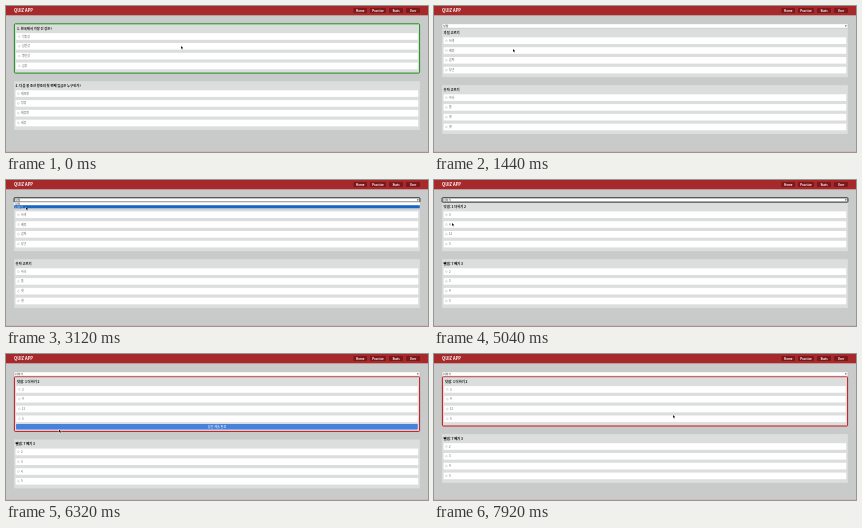
An HTML page with a canvas for the animation above (8 s loop, 422 by 146 pixels).

```html
<!DOCTYPE html>
<html lang="ko">
<head>
<meta charset="utf-8">
<title>Quiz</title>
<style>
  html, body { margin: 0; width: 100%; height: 100%; overflow: hidden; background: #c9cbca; }
  canvas { display: block; }
</style>
</head>
<body>
<canvas id="stage" width="422" height="146"></canvas>
<script>
const ctx = document.getElementById('stage').getContext('2d');
const LOOP = 8000;
const LEFT = 8.2, WIDTH = 405.6;
const FONT = '"Noto Sans CJK KR", "Noto Sans CJK", "Noto Sans", sans-serif';

// Page changes, in ms
const OPEN_QUIZ = 960, FOCUS = 2560, OPEN_LIST = 2640, NEXT_OPTION = 2800,
      CHOOSE = 3360, ANSWER = 5360, SUBMIT = 6240, HIDE_BUTTON = 6640;

const quizzes = {
  history: [
    { title: '1. 한국에서 가장 긴 강은?', options: ['낙동강', '섬진강', '영산강', '금강'] },
    { title: '2. 다음 중 조선 왕조의 첫 번째 임금은 누구인가?', options: ['태조왕', '정종', '태종왕', '세종'] }
  ],
  words: [
    { title: '과일 고르기', options: ['사과', '배추', '감자', '당근'] },
    { title: '숫자 고르기', options: ['하나', '둘', '셋', '넷'] }
  ],
  sums: [
    { title: '덧셈: 1 더하기 2', options: ['3', '4', '12', '5'] },
    { title: '뺄셈: 7 빼기 3', options: ['2', '3', '4', '5'] }
  ]
};

// Pointer positions: time, x, y
const pointerPath = [
  [0, 175, 40], [400, 17, 103], [800, 18, 6], [960, 18, 7], [1440, 79, 43],
  [1760, 79, 43], [2560, 22, 20], [2720, 22, 23], [2880, 20, 27], [3760, 20, 27],
  [4400, 18, 43], [5040, 18, 43], [5360, 12.5, 34], [5840, 32.5, 55],
  [6240, 53, 75], [6400, 53, 76], [6720, 50, 78], [6960, 18, 45], [7200, 394, 24],
  [7520, 247, 68], [7720, 247, 68], [7920, 239, 61], [8000, 239, 61]
];

function pointerAt(t) {
  const i = pointerPath.findIndex(p => p[0] > t);
  const [t0, x0, y0] = pointerPath[i - 1], [t1, x1, y1] = pointerPath[i];
  const p = (t - t0) / (t1 - t0), e = p * p * (3 - 2 * p);
  return [x0 + (x1 - x0) * e, y0 + (y1 - y0) * e];
}

function rect(x, y, w, h, color) {
  ctx.fillStyle = color;
  ctx.fillRect(x, y, w, h);
}

function outline(x, y, w, h, color, width, radius = 0) {
  ctx.strokeStyle = color;
  ctx.lineWidth = width;
  ctx.beginPath();
  ctx.roundRect(x, y, w, h, radius);
  ctx.stroke();
}

function text(value, x, y, size, color, weight = 400, align = 'left') {
  ctx.font = `${weight} ${size}px ${FONT}`;
  ctx.fillStyle = color;
  ctx.textAlign = align;
  ctx.textBaseline = 'middle';
  ctx.fillText(value, x, y);
}

function drawHeader() {
  rect(0, 0, 422, 9.3, '#a62a2b');
  text('QUIZ APP', 8, 4.5, 4.1, '#fff', 700);
  [['Home', 347.5, 13.5], ['Practice', 364, 16], ['Stats', 383, 14], ['User', 400, 14]]
    .forEach(([label, x, w]) => {
      ctx.fillStyle = '#7d1719';
      ctx.beginPath();
      ctx.roundRect(x, 1.9, w, 5.2, 0.8);
      ctx.fill();
      text(label, x + w / 2, 4.5, 2.9, '#fff', 700, 'center');
    });
  rect(0, 145.1, 422, 0.9, '#d9b5b6');
}

function drawRadio(x, y, selected) {
  ctx.beginPath();
  ctx.arc(x, y, 0.9, 0, Math.PI * 2);
  ctx.fillStyle = selected ? '#3478d8' : '#fff';
  ctx.fill();
  ctx.strokeStyle = selected ? '#3478d8' : '#999';
  ctx.lineWidth = 0.3;
  ctx.stroke();
}

// Draws one question and returns the y of the next one
function drawCard(y, { title, options }, { border, button, selected } = {}) {
  const inset = border ? 0.9 : 0;
  const height = 48.8 + inset + (button ? 5.4 : 0);
  rect(LEFT, y, WIDTH, height, '#dcdedd');
  if (border) outline(LEFT + 0.2, y + 0.4, WIDTH - 0.4, height - 0.4, border, 1, 0.8);
  text(title, 9.6 + inset * 1.6, y + 4.7 + inset / 2, 3.3, '#111', 700);
  options.forEach((option, i) => {
    const top = y + 9.1 + inset * 0.8 + i * 9.8;
    rect(9.6 + inset / 2, top, 402.6 - inset, 6.6, '#fff');
    drawRadio(12.4 + inset, top + 3.3, i === selected);
    text(option, 15 + inset, top + 3.3, 2.9, '#555');
  });
  if (button) {
    const top = y + 46.8 + inset;
    ctx.fillStyle = '#4681dc';
    ctx.beginPath();
    ctx.roundRect(9.6 + inset / 2, top, 402.6 - inset, 5.4, 0.6);
    ctx.fill();
    text(button, 211, top + 2.7, 3.1, '#fff', 400, 'center');
  }
  return y + height + 8.1;
}

function drawSelect(t) {
  rect(LEFT, 17.8, WIDTH, 4.4, '#fff');
  const focused = t >= FOCUS && t < ANSWER;
  outline(LEFT - 0.1, 17.8, WIDTH + 0.2, 4.3, focused ? '#111' : '#999', focused ? 0.9 : 0.3, 0.5);
  text(t < CHOOSE ? '낱말' : '더하기', 9.3, 20, 2.8, '#222');
  ctx.fillStyle = '#222';
  ctx.beginPath();
  ctx.moveTo(410.8, 19.4);
  ctx.lineTo(412.8, 19.4);
  ctx.lineTo(411.8, 20.7);
  ctx.fill();
}

function drawList(t) {
  const second = t >= NEXT_OPTION;
  rect(LEFT, 28.3, WIDTH, 1, 'rgba(0,0,0,.12)');
  rect(LEFT, 22.2, WIDTH, 6.2, '#fff');
  rect(LEFT, second ? 25.2 : 22.2, WIDTH, 3.1, '#1967c4');
  text('낱말', 9.3, 23.7, 2.7, second ? '#222' : '#fff');
  text('더하기', 9.3, 26.7, 2.7, second ? '#fff' : '#222');
}

function drawPointer(t) {
  const [x, y] = pointerAt(t);
  ctx.beginPath();
  [[0, 0], [0, 2.9], [0.7, 2.3], [1.2, 3.4], [1.7, 3.1], [1.2, 2.1], [2.1, 2.1]]
    .forEach(([dx, dy]) => ctx.lineTo(x + dx, y + dy));
  ctx.closePath();
  ctx.strokeStyle = '#fff';
  ctx.lineWidth = 0.6;
  ctx.stroke();
  ctx.fillStyle = '#111';
  ctx.fill();
}

function draw(t) {
  rect(0, 0, 422, 146, '#c9cbca');
  drawHeader();
  if (t < OPEN_QUIZ) {
    const [first, second] = quizzes.history;
    drawCard(drawCard(17.4, first, { border: '#169016' }), second);
  } else {
    const [first, second] = t < CHOOSE ? quizzes.words : quizzes.sums;
    const submitted = t >= SUBMIT;
    const state = {
      border: submitted && '#c41418',
      button: t >= ANSWER && t < HIDE_BUTTON && (submitted ? '답안 제출 완료' : '답안 제출하기'),
      selected: t >= ANSWER && !submitted ? 0 : -1
    };
    drawCard(drawCard(22.3, first, state), second);
    drawSelect(t);
    if (t >= OPEN_LIST && t < CHOOSE) drawList(t);
  }
  drawPointer(t);
}

function tick() {
  draw(performance.now() % LOOP);
  requestAnimationFrame(tick);
}
tick();
</script>
</body>
</html>
```
